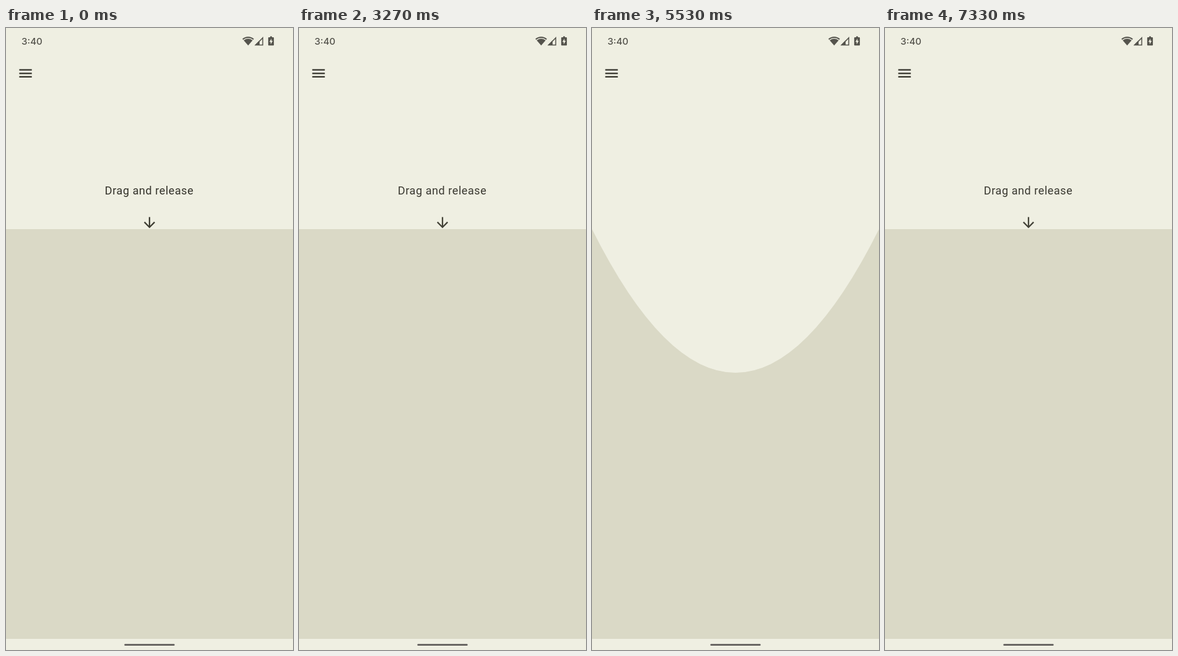
An HTML page with a canvas that plays this animation: 464x1005 px, repeating every 8 s.

```html
<!DOCTYPE html>
<html lang="en">
<head>
<meta charset="utf-8">
<title>Drag and release</title>
<style>
  html, body { margin: 0; width: 100%; height: 100%; overflow: hidden; background: #efefe2; }
  canvas { display: block; width: 464px; height: 1005px; }
</style>
</head>
<body>
<canvas id="stage" width="464" height="1005"></canvas>
<script>
const ctx = document.getElementById('stage').getContext('2d');
const W = 464, H = 1005, LOOP = 8000, FRAME = 1000 / 30;
const EDGE = 325, PANEL_END = 987, ICON = 27.07 / 24;
const LIGHT = '#efefe2', SAND = '#dad9c6', INK = '#33322a', STATUS = '#55544d';

const MENU = new Path2D('M3 18h18v-2H3v2zm0-5h18v-2H3v2zm0-7v2h18V6H3z');
const ARROW = new Path2D('M20 12l-1.41-1.41L13 16.17V4h-2v12.17l-5.58-5.59L4 12l8 8 8-8z');
const BATTERY = new Path2D('M427 13.6h3v1.5h2.1a1 1 0 0 1 1 1v11.2a1 1 0 0 1-1 1h-7.2a1 1 0 0 1-1-1V16.1a1 1 0 0 1 1-1h2.1z');
const BOLT = new Path2D('M429.2 17.2l-3.4 5.2h2.1v3.8l3.4-5.4h-2.1z');

// Second drag: time, depth, speed in px/s
const PULL = [
  [4167, 0, 80], [4833, 79.5, 160], [5000, 109.3, 205],
  [5533, 232, 125], [5800, 244, 0], [5867, 242, 0]
];
const RELEASE = [2466.7, 6383.3];
const HIDE = [500, 4167];
const SHOW = [3133.3, 7200];
const OMEGA = Math.sqrt(1500);

function spring(ms) {
  const t = ms / 1000, z = 0.2, root = Math.sqrt(1 - z * z), a = OMEGA * root * t;
  return Math.exp(-z * OMEGA * t) * (Math.cos(a) + z / root * Math.sin(a));
}

function settle(ms) {
  const x = OMEGA * Math.max(0, ms) / 1000;
  return 1 - (1 + x) * Math.exp(-x);
}

function firstPull(t) {
  const u = (t - 500) / 1000;
  return 39.9 * u - 6.83 * u * u;
}

function secondPull(t) {
  const i = PULL.findIndex(p => p[0] > t);
  if (i < 0) return PULL[PULL.length - 1][1];
  const [t0, d0, v0] = PULL[i - 1], [t1, d1, v1] = PULL[i];
  const span = (t1 - t0) / 1000, s = (t - t0) / (t1 - t0), r = 1 - s;
  return d0 * r * r * (1 + 2 * s) + d1 * s * s * (3 - 2 * s)
    + span * s * r * (v0 * r - v1 * s);
}

function depth(t) {
  if (t < HIDE[0]) return 0;
  if (t < RELEASE[0]) return firstPull(Math.min(t, 2400));
  if (t < SHOW[0]) return 51.2 * spring(t - RELEASE[0]);
  if (t < HIDE[1]) return 0;
  if (t < RELEASE[1]) return secondPull(t);
  if (t < SHOW[1]) return 242 * spring(t - RELEASE[1]);
  return 0;
}

function labelAlpha(t) {
  const i = t < SHOW[0] ? 0 : 1;
  if (t >= SHOW[1]) return settle(t - SHOW[1]);
  if (i && t < HIDE[1]) return settle(t - SHOW[0]);
  return 1 - settle(t - HIDE[i]);
}

function icon(path, x, y, color) {
  ctx.save();
  ctx.translate(x, y);
  ctx.scale(ICON, ICON);
  ctx.fillStyle = color;
  ctx.fill(path);
  ctx.restore();
}

function polygon(...pts) {
  ctx.beginPath();
  pts.forEach(([x, y]) => ctx.lineTo(x, y));
  ctx.closePath();
}

function text(str, x, y, font, color, spacing) {
  ctx.font = font;
  ctx.letterSpacing = spacing;
  ctx.fillStyle = color;
  ctx.fillText(str, x, y);
}

function wifi(x, y) {
  const up = -Math.PI / 2, half = 0.72;
  ctx.fillStyle = STATUS;
  ctx.beginPath();
  ctx.moveTo(x, y);
  ctx.arc(x, y, 14.2, up - half, up + half);
  ctx.fill();
  ctx.strokeStyle = LIGHT;
  ctx.lineWidth = 1.4;
  ctx.beginPath();
  ctx.arc(x, y, 11.6, up - half, up + half);
  ctx.stroke();
}

function statusBar() {
  text('3:40', 25, 26.8, '500 15.2px Inter, sans-serif', STATUS, '0px');
  wifi(391.5, 28.2);
  ctx.strokeStyle = ctx.fillStyle = STATUS;
  ctx.lineWidth = 1.5;
  polygon([403.6, 27.4], [415.1, 27.4], [415.1, 15.9]);
  ctx.stroke();
  polygon([402, 28.1], [410, 28.1], [410, 20.1]);
  ctx.fill();
  ctx.fill(BATTERY);
  ctx.fillStyle = LIGHT;
  ctx.fill(BOLT);
}

function draw(t) {
  ctx.fillStyle = LIGHT;
  ctx.fillRect(0, 0, W, H);

  ctx.fillStyle = SAND;
  ctx.beginPath();
  ctx.moveTo(0, EDGE);
  ctx.quadraticCurveTo(W / 2, EDGE + 2 * depth(t), W, EDGE);
  ctx.lineTo(W, PANEL_END);
  ctx.lineTo(0, PANEL_END);
  ctx.fill();

  statusBar();
  icon(MENU, 18.05, 59.8, INK);

  ctx.globalAlpha = labelAlpha(t);
  text('Drag and release', 159.85, 268.8, '18.05px Roboto, sans-serif', INK, '0.56px');
  icon(ARROW, 218.46, 300.9, '#3d3c32');
  ctx.globalAlpha = 1;

  ctx.fillStyle = '#5f5c5a';
  ctx.beginPath();
  ctx.roundRect(191.3, 995.3, 81.4, 2.8, 1.4);
  ctx.fill();
}

function tick() {
  const t = performance.now() % LOOP;
  draw(Math.floor((t + 3.4) / FRAME) * FRAME);
  requestAnimationFrame(tick);
}
tick();
</script>
</body>
</html>
```
